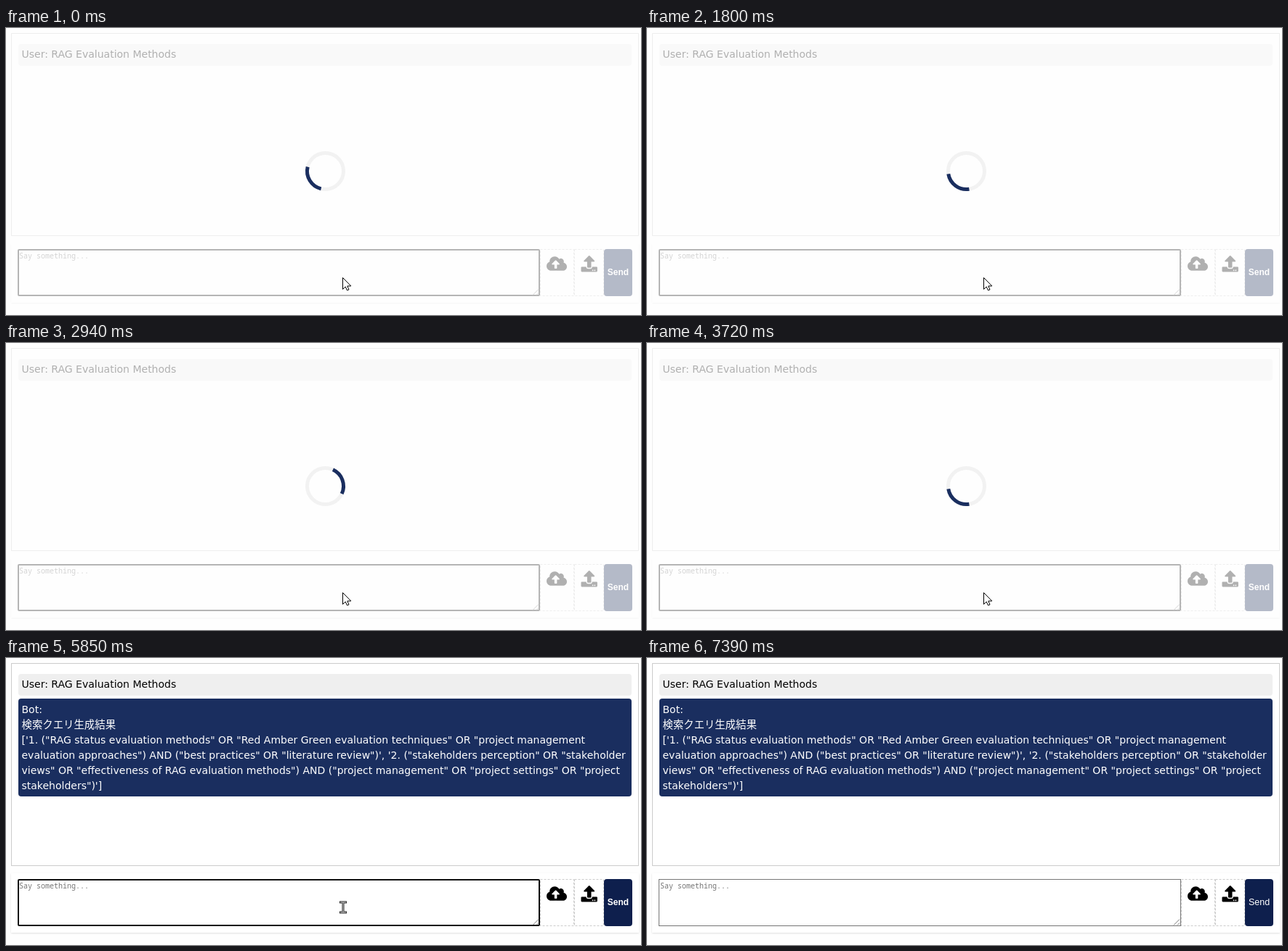
Write an HTML page that moves like this. It is 874 px wide and 396 px high and loops after 8 s.

```html
<!DOCTYPE html>
<html lang="en">
<head>
<meta charset="utf-8">
<title>Chat query demo</title>
<style>
  html, body { margin: 0; width: 100%; height: 100%; overflow: hidden; background: #fefefe; }
  svg { display: block; width: 874px; height: 396px; }
  .chat { font: 14px "DejaVu Sans", "Noto Sans CJK JP", sans-serif; }
  .jp { font: 14.4px "Noto Sans CJK JP", "Noto Sans CJK", sans-serif; }
  .hint { font: 10px "Noto Sans Mono", monospace; fill: #757575; }
  .send { font: 12.5px "Liberation Sans", Arial, sans-serif; fill: #fff; text-anchor: middle; }
  .send.soft { font-size: 12px; font-weight: bold; }
  .dash { fill: none; stroke: #ccc; stroke-dasharray: 3 2; }
  .panel { fill: #fff; filter: drop-shadow(0 1px 1px rgba(0, 0, 0, .12)); }
</style>
</head>
<body>
<svg viewBox="0 0 874 396" xmlns="http://www.w3.org/2000/svg">
  <g id="page">
    <rect x="7.5" y="7.5" width="863" height="279" fill="#fff" stroke="#ccc"/>
    <rect id="userBg" x="17" y="22" width="844" height="30" rx="4" fill="#efefef"/>
    <text class="chat" x="21.5" y="41">User: RAG Evaluation Methods</text>
    <g id="reply" fill="#fff">
      <rect x="17" y="56" width="844" height="135" rx="4" fill="#1a2e5f"/>
    </g>

    <rect class="panel" x="7" y="297" width="864" height="82"/>
    <rect id="field" fill="#fff"/>
    <text class="hint" x="18" y="318">Say something...</text>
    <rect id="caret" x="19" y="308" width="1" height="12"/>
    <path d="M725 368.5l8-8M730 368.5l3-3" stroke="#777" fill="none"/>

    <rect class="dash" x="735.5" y="305.5" width="46" height="64"/>
    <rect class="dash" x="782.5" y="305.5" width="40" height="64"/>
    <path transform="translate(744 313.8) scale(.04375)" fill-rule="evenodd"
      d="M538 227C572 130 472 60 395 112C367 64 315 32 256 32C168 32 96 104 96 192V200C40 220 0 273 0 336
         C0 416 64 480 144 480H512C583 480 640 423 640 352C640 290 596 238 538 227Z
         M393 288H328V400Q328 416 312 416H264Q248 416 248 400V288H183C168 288 161 271 171 261
         L277 155Q288 146 299 155L405 261C415 271 408 288 393 288Z"/>
    <path transform="translate(791.5 314) scale(.04375)" fill-rule="evenodd"
      d="M296 384H216Q192 384 192 360V192H104C87 192 78 170 90 158L242 6Q256 -5 270 6L422 158
         C434 170 425 192 408 192H320V360Q320 384 296 384Z
         M512 376V488Q512 512 488 512H24Q0 512 0 488V376Q0 352 24 352H160V360Q160 416 216 416H296
         Q352 416 352 360V352H488Q512 352 512 376Z
         M348 464a20 20 0 1 0 40 0a20 20 0 1 0 -40 0zM412 464a20 20 0 1 0 40 0a20 20 0 1 0 -40 0z"/>
    <rect x="823" y="305" width="39" height="65" rx="4" fill="#0e1f4d"/>
    <text id="send" class="send" x="842.5" y="341">Send</text>
  </g>

  <g id="spinner" fill="none" stroke-width="5">
    <circle cx="439.5" cy="197.5" r="25" stroke="#f2f2f2"/>
    <path id="arc" stroke="#1a2e5f" d="M457.18 179.82A25 25 0 0 1 457.18 215.18"/>
  </g>
  <path id="arrow" transform="translate(463.5 344.5)" fill="#fff" stroke="#000"
    d="M0 0V16L3.7 12.5L6 17.5L8.5 16.5L6.3 11.5H11.3Z"/>
  <g id="beam" fill="none">
    <path d="M459 337H469M459 351H469M464 337V351" stroke="#222" stroke-width="3"/>
    <path d="M460 337H468M460 351H468M464 337V351" stroke="#ddd"/>
  </g>
</svg>
<script>
const LOOP = 8000, LOADED = 3840, BEAM_OFF = 6000, BLUR = 7390;
const DEG_PER_MS = 360 / 1920, START_DEG = 148.5;

// Moments at which the spinner is redrawn
const TICKS = [0, 150, 270, 390, 540, 660, 780, 900, 1020, 1170, 1290, 1410, 1560, 1680, 1800,
  1950, 2100, 2220, 2370, 2520, 2670, 2790, 2940, 3060, 3180, 3300, 3420, 3570, 3720];
const BLINKS = [150, 660, 1170, 1680, 2220, 2670, 3180, 3720, 4270, 4800, 5320, 5850, 6400, 6960];

const REPLY = [
  'Bot:',
  '検索クエリ生成結果',
  `['1. ("RAG status evaluation methods" OR "Red Amber Green evaluation techniques" OR "project management`,
  `evaluation approaches") AND ("best practices" OR "literature review")', '2. ("stakeholders perception" OR "stakeholder`,
  `views" OR "effectiveness of RAG evaluation methods") AND ("project management" OR "project settings" OR "project`,
  `stakeholders")']`
];

const $ = id => document.getElementById(id);
const show = (id, on) => $(id).setAttribute('visibility', on ? 'visible' : 'hidden');
const setAttrs = (el, attrs) => {
  for (const key in attrs) el.setAttribute(key, attrs[key]);
};

REPLY.forEach((line, i) => {
  const text = document.createElementNS('http://www.w3.org/2000/svg', 'text');
  setAttrs(text, { class: i === 1 ? 'jp' : 'chat', x: 21.5, y: 76 + 21 * i });
  text.textContent = line;
  $('reply').append(text);
});

function drawField(focused) {
  setAttrs($('field'), focused
    ? { x: 17, y: 306, width: 717, height: 63, rx: 1, stroke: '#101010', 'stroke-width': 2 }
    : { x: 16.5, y: 305.5, width: 718, height: 64, rx: 0, stroke: '#767676', 'stroke-width': 1 });
}

function render(t) {
  const loading = t < LOADED, focused = t < BLUR;
  const tick = TICKS.filter(at => at <= t).pop();
  const blinks = BLINKS.filter(at => at <= t).length;

  $('page').setAttribute('opacity', loading ? .3 : 1);
  show('reply', !loading);
  show('spinner', loading);
  show('arrow', loading);
  show('beam', !loading && t < BEAM_OFF);
  show('caret', focused && blinks % 2 === 1);
  $('arc').setAttribute('transform', `rotate(${START_DEG + tick * DEG_PER_MS} 439.5 197.5)`);
  drawField(focused);
  $('send').setAttribute('class', focused ? 'send soft' : 'send');
}

const begin = performance.now();
function frame() {
  render((performance.now() - begin) % LOOP);
  requestAnimationFrame(frame);
}
frame();
</script>
</body>
</html>
```
